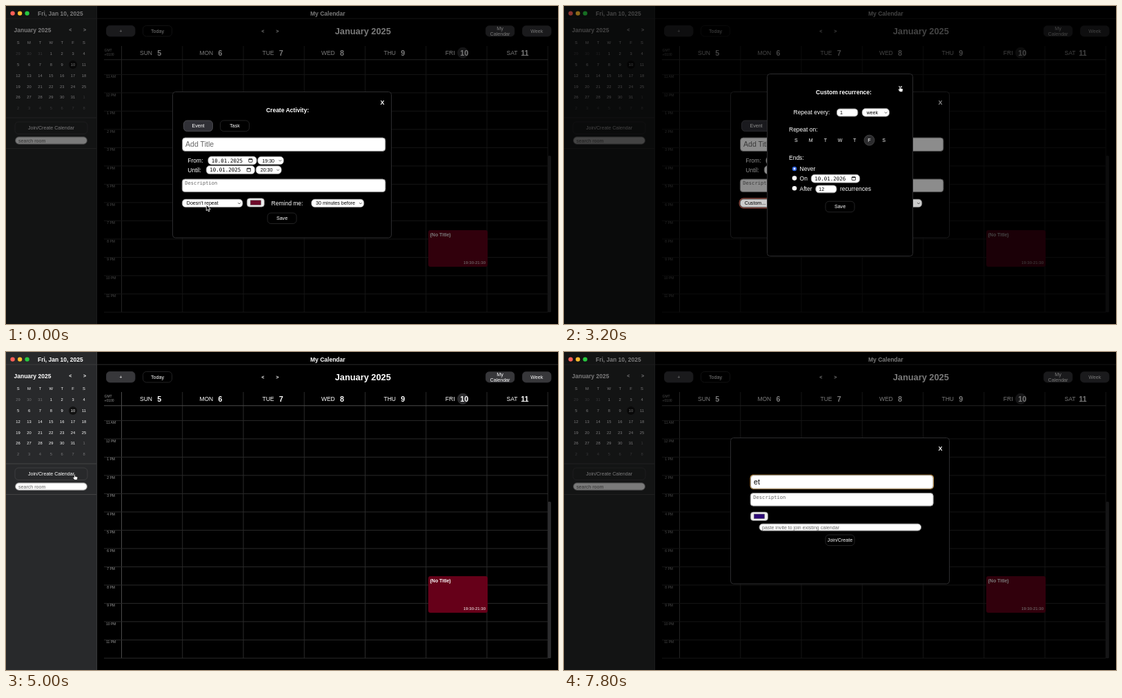
Recreate the animation shown at these times as an HTML page. Size 800x461 px, loop 8000 ms.

```html
<!DOCTYPE html>
<html lang="en">
<head>
<meta charset="utf-8">
<title>My Calendar</title>
<style>
  html, body { margin: 0; width: 100%; height: 100%; overflow: hidden; background: #000; }
  svg { display: block; width: 100%; height: 100%; }
  text { font-family: "Liberation Sans", Arial, sans-serif; white-space: pre; }
  .mono { font-family: "DejaVu Sans Mono", monospace; }
</style>
</head>
<body>
<svg id="stage" viewBox="0 0 800 461" xmlns="http://www.w3.org/2000/svg"></svg>
<script>
const LOOP = 8000, STEP = 200;
const stage = document.getElementById('stage');

// ---- drawing helpers (text y is the middle of the capitals) ----
const rect = (x, y, w, h, fill, r = 0, stroke = 'none', sw = 1) =>
  `<rect x="${x}" y="${y}" width="${w}" height="${h}" rx="${r}" fill="${fill}" stroke="${stroke}" stroke-width="${sw}"/>`;
const line = (x1, y1, x2, y2, color = '#2a2a2a', w = 1) =>
  `<path d="M${x1} ${y1}L${x2} ${y2}" stroke="${color}" stroke-width="${w}" fill="none"/>`;
const circle = (x, y, r, fill, stroke = 'none', sw = 1) =>
  `<circle cx="${x}" cy="${y}" r="${r}" fill="${fill}" stroke="${stroke}" stroke-width="${sw}"/>`;
const text = (s, x, y, { size = 7.1, fill = '#fff', anchor = 'start', bold = false, mono = false } = {}) =>
  `<text x="${x}" y="${(y + size * 0.355).toFixed(2)}" font-size="${size}" fill="${fill}" text-anchor="${anchor}"` +
  `${bold ? ' font-weight="700"' : ''}${mono ? ' class="mono"' : ''}>${s}</text>`;
const mid = (s, x, y, o = {}) => text(s, x, y, { ...o, anchor: 'middle' });
const group = (id, body) => `<g id="${id}">${body}</g>`;

// ---- form controls ----
const button = (s, x, y, w, h, fill = '#000', stroke = '#2b2b2d') =>
  rect(x, y, w, h, fill, 5, stroke, 0.8) + mid(s, x + w / 2, y + h / 2);
const field = (x, y, w, h, r = 4) => rect(x, y, w, h, '#fff', r, '#8a8a8a', 1);
const chevron = (x, y) =>
  `<path d="M${x - 1.8} ${y - 0.8}l1.8 1.9l1.8 -1.9" fill="none" stroke="#444" stroke-width=".8"/>`;
const select = (id, s, x, y, w, h = 11.6) =>
  rect(x, y, w, h, '#fff', 5, '#777', 0.7) +
  group(id, text(s, x + 6.5, y + h / 2, { fill: '#000' })) + chevron(x + w - 5, y + h / 2);
const dateInput = (s, x, y) =>
  rect(x, y, 70.5, 12, '#fff', 5, '#777', 0.7) +
  text(s, x + 5, y + 6.2, { size: 7.5, fill: '#000', mono: true }) +
  rect(x + 59, y + 3.6, 5.2, 4.8, 'none', 0.6, '#111', 0.8) + line(x + 59, y + 4.2, x + 64.2, y + 4.2, '#111', 1.2);
const swatch = (x, y, color) =>
  rect(x, y, 25.2, 12.4, '#eee', 4, '#777', 0.6) + rect(x + 5, y + 3, 15.2, 6.5, color, 0, '#555', 0.5);
const panel = (x, y, w, h) => rect(x, y, w, h, '#000', 4, '#2c2c2e', 1);
const radio = (y, on) => circle(334, y, 3.3, on ? '#2f63e0' : '#fff') + (on ? circle(334, y, 1.4, '#fff') : '');

// ---- app window ----
function sidebar() {
  let s = rect(0, 0, 132, 461, '#28292b') + line(131.6, 0, 131.6, 461, '#3a3a3c') +
    line(0, 18.2, 131, 18.2, '#3a3a3c') + line(0, 162, 131, 162, '#444') + line(0, 206.6, 131, 206.6, '#444') +
    text('Fri, Jan 10, 2025', 46, 10.5, { size: 8.5, bold: true }) +
    text('January 2025', 11.5, 34.5, { size: 8.5, bold: true }) +
    mid('&lt;', 93.3, 34.5, { bold: true }) + mid('&gt;', 114, 34.5, { bold: true }) +
    circle(97, 85, 6, '#111');
  [...'SMTWTFS'].forEach((d, i) => s += mid(d, 17.6 + i * 15.9, 53, { size: 5.8 }));
  for (let i = 0; i < 42; i++) {
    const n = i - 2, day = n < 1 ? n + 31 : n > 31 ? n - 31 : n;
    s += mid(day, 17.6 + i % 7 * 15.9, 69 + Math.floor(i / 7) * 15.85,
      { size: 5.8, fill: n < 1 || n > 31 ? '#747476' : '#fff' });
  }
  return s + button('Join/Create Calendar', 13, 168, 105, 17.5, '#28292b', '#434345') +
    field(13.6, 189.8, 103.8, 10.4, 5) + text('search room', 18, 195, { fill: '#666' });
}

function week() {
  const left = 167.5, colW = 88.25;
  let s = line(132, 18.2, 800, 18.2, '#2a2a2a') +
    mid('My Calendar', 466.3, 10.5, { size: 8.5, bold: true }) +
    button('+', 145.5, 28.5, 41.5, 15.5, '#37373a', '#37373a') + button('Today', 198.5, 28.5, 42, 15.5) +
    mid('&lt;', 372.3, 36.3, { bold: true }) + mid('&gt;', 393.3, 36.3, { bold: true }) +
    mid('January 2025', 517.3, 36.5, { size: 12.8, bold: true }) +
    button('', 695.3, 28.8, 41.5, 15.2, '#37373a', '#37373a') + button('Week', 748.5, 28.8, 41.5, 15.2, '#37373a', '#37373a') +
    mid('My', 716, 32.6) + mid('Calendar', 716, 40.4) +
    text('GMT', 142.5, 64.4, { size: 5, fill: '#999' }) + text('+0100', 142.5, 70.6, { size: 5, fill: '#999' });
  for (let i = 0; i < 8; i++) s += line(left + i * colW, 58, left + i * colW, 444, i ? '#2a2a2a' : '#4a4a4a');
  s += line(142, 77.8, 785.5, 77.8, '#4a4a4a');
  for (let i = 0; i < 14; i++) s += line(142, 99.4 + i * 26.5, 785.5, 99.4 + i * 26.5);
  for (let i = 0; i < 13; i++) {
    const label = i < 1 ? '11 AM' : (i < 2 ? 12 : i - 1) + ' PM';
    s += mid(label, 152.2, 102.6 + i * 26.5, { size: 5, fill: '#999' });
  }
  s += circle(662, 67.8, 8, '#2c2c2e');
  ['SUN', 'MON', 'TUE', 'WED', 'THU', 'FRI', 'SAT'].forEach((d, i) => {
    const x = left + i * colW, end = i === 5 ? 41.8 : 44.5;
    s += text(d, x + end, 67.8, { size: 8.5, anchor: 'end' }) +
      mid(i + 5, x + (i === 5 ? 55.5 : 54.8), 67.8, { size: 10.7, bold: true });
  });
  return s + rect(785.3, 217, 4.6, 227, '#2c2c2e', 1.5) +
    rect(612, 325, 86, 53, '#660019', 3) +
    text('(No Title)', 614.5, 331.5, { size: 7, bold: true }) +
    text('19:30-21:30', 695, 371.8, { size: 6, anchor: 'end' });
}

// ---- dialogs ----
const closeX = (x, y) => mid('X', x, y, { size: 8.8, bold: true });
const activity = () =>
  panel(241.5, 124.5, 317, 211.5) + group('closeHover', rect(538, 130.5, 15, 17, '#3a3a3d', 5)) + closeX(545.5, 140) +
  mid('Create Activity:', 408, 150.5, { size: 8.5, bold: true }) +
  button('Event', 257.5, 166, 42, 15.6, '#303036', '#55555a') + button('Task', 310.5, 166, 42, 15.6) +
  field(255.6, 191, 294.2, 19.4) + text('Add Title', 260, 200.6, { size: 10.6, fill: '#666' }) +
  text('From:', 263.3, 224, { size: 8.5 }) + dateInput('10.01.2025', 292.8, 218) + select('fromTime', '19:30', 364.8, 218.2, 37.6) +
  text('Until:', 263.3, 237.5, { size: 8.5 }) + dateInput('10.01.2025', 290.2, 231.6) + select('untilTime', '20:30', 362.2, 231.8, 37) +
  field(255.3, 251, 294.6, 18.6) + text('Description', 259.3, 256.8, { size: 7.1, fill: '#666', mono: true }) +
  swatch(349.2, 278.8, '#6e0a2a') + text('Remind me:', 384.6, 285.8, { size: 8.5 }) +
  button('Save', 379, 300, 42, 15.5);
const selects = () =>
  group('focusRing', rect(254.2, 279, 90, 13.8, 'none', 6, '#b0574a', 1.4)) +
  select('repeat', "Doesn't repeat", 255.3, 280.1, 87.7) + select('remind', '30 minutes before', 442.6, 280.1, 76.2);

function menu() {
  const items = ["Doesn't repeat", 'Daily', 'Weekdays', 'Weekly', '10. day every Month', '2. Friday every Month', 'Annually', 'Custom...'];
  return rect(251, 278, 91, 98, '#2b2b2d', 4, '#444', 0.7) +
    group('pick', rect(254.5, -5.9, 84, 11.8, '#2546c0', 2.5)) +
    `<path d="M256.6 286l1.5 2l2.6 -4.2" fill="none" stroke="#fff" stroke-width=".9"/>` +
    items.map((s, i) => text(s, 263.2, 286 + i * 11.7)).join('');
}

function recurrence() {
  let s = panel(294.5, 98.5, 211, 264) + closeX(487.4, 118.5) +
    mid('Custom recurrence:', 405.5, 124.8, { size: 8.5, bold: true }) +
    text('Repeat every:', 332.5, 154, { size: 8.5 }) +
    field(395.4, 149, 30.4, 11, 4.5) + text('1', 400, 154.6, { fill: '#000' }) + select('unit', 'week', 432, 148.6, 39.5) +
    text('Repeat on:', 326, 178.8, { size: 8.5 }) + circle(442.5, 194.6, 7.5, '#2c2c2e', '#48484a', 0.8);
  [...'SMTWTFS'].forEach((d, i) => s += mid(d, 336.4 + i * 21.2, 194.4));
  return s + text('Ends:', 326, 220.2, { size: 8.5 }) +
    radio(236, true) + text('Never', 341.6, 236.4, { size: 8.5 }) +
    radio(249.6) + text('On', 341.6, 250, { size: 8.5 }) + dateInput('10.01.2026', 358.2, 244.2) +
    radio(264.2) + text('After', 341.6, 264.8, { size: 8.5 }) +
    field(364.8, 260, 30.2, 10.8, 4.5) + text('12', 369.2, 265.4, { fill: '#000' }) +
    text('recurrences', 400, 264.8, { size: 8.5 }) + button('Save', 379, 283.2, 42, 15.5);
}

const room = () =>
  panel(241.5, 124.5, 317, 211.5) + closeX(545.5, 140) +
  group('roomFocus', rect(269.6, 177.7, 266.4, 21.2, '#f0a020', 5)) +
  field(270.6, 178.7, 264.4, 19.4) + group('roomTitle', '') +
  field(270.2, 204.6, 265, 18.6) + text('Description', 274.3, 210.3, { size: 7.1, fill: '#666', mono: true }) +
  swatch(270.4, 232, '#2e0a78') +
  field(283, 249.1, 234.6, 10, 5) + text('paste invite to join existing calendar', 287, 254.1, { fill: '#666' }) +
  button('Join/Create', 379, 265, 42, 15.6);

const arrow = `<path d="M0 0V8.6L2 6.9L3.3 9.8L4.7 9.2L3.4 6.4H6Z" fill="#000" stroke="#fff" stroke-width=".8" stroke-linejoin="round"/>`;
const hand = `<path d="M0 .6Q.8 -.4 1.5 .6V3.2L4.6 4Q5.4 4.2 5.2 5.4L4.5 8.4H.8L-1.8 5.2Q-1.6 4.2 -.6 4.6L0 5Z" fill="#fff" stroke="#000" stroke-width=".6"/>`;

stage.innerHTML =
  group('app', sidebar() + week()) +
  group('shade', rect(0, 0, 800, 461, '#000')) +
  ['#ff5f57', '#febc2e', '#28c840'].map((c, i) => circle(9.6 + i * 10.5, 10.6, 3.2, c)).join('') +
  group('activity', activity()) + group('shade2', rect(0, 0, 800, 461, '#000')) + group('selects', selects()) +
  group('menu', menu()) + group('recurrence', recurrence()) + group('room', room()) +
  group('arrow', arrow) + group('hand', hand);

const el = {};
stage.querySelectorAll('[id]').forEach(g => el[g.id] = g);
const show = (id, on) => el[id].style.display = on ? '' : 'none';

// ---- motion: time, x, y of the pointer tip ----
const path = [
  [0, 290.3, 288.2], [200, 290.3, 288.2], [1000, 291, 372], [1400, 291, 372], [2200, 425.8, 214],
  [2600, 427, 212], [3100, 486, 116], [3400, 486, 116], [3900, 542.6, 141], [4200, 542.6, 141],
  [4900, 98.6, 177], [5400, 98.6, 177], [6200, 330, 188], [8000, 330, 188]
];
function pointer(t) {
  const i = path.findIndex((p, k) => k && t <= p[0]);
  const [t0, x0, y0] = path[i - 1], [t1, x1, y1] = path[i];
  const u = (t - t0) / (t1 - t0), e = u * u * (3 - 2 * u);
  return [x0 + (x1 - x0) * e, y0 + (y1 - y0) * e];
}

function render(t) {
  const [x, y] = pointer(t);
  const inActivity = t < 4200, inRoom = t >= 5200, inMenu = t >= 200 && t < 1400;
  const inRecur = t >= 1400 && t < 3400, focused = t >= 6200;

  show('shade', inActivity || inRoom);
  el.shade.setAttribute('opacity', 0.52);
  show('activity', inActivity);
  show('selects', inActivity);
  show('shade2', inRecur);
  el.shade2.setAttribute('opacity', 0.45);
  el.selects.setAttribute('opacity', inRecur ? 0.8 : 1);
  show('focusRing', inRecur);
  show('recurrence', inRecur);
  show('room', inRoom);
  el.repeat.firstChild.textContent = t < 1400 ? "Doesn't repeat" : 'Custom...';

  show('menu', inMenu);
  el.menu.setAttribute('opacity', t < 1200 ? 1 : 0.38);
  const row = Math.max(0, Math.min(7, Math.round((y - 286) / 11.7)));
  el.pick.setAttribute('transform', `translate(0 ${286 + row * 11.7})`);

  const overClose = t >= 3800 && t < 4200;
  show('closeHover', overClose);
  show('roomFocus', focused);
  const typed = t >= 7800 ? 'et' : t >= 7600 ? 'e' : '';
  el.roomTitle.innerHTML = text(typed || 'Unnamed Room', 275, 188.3, { size: 10.6, fill: typed ? '#000' : '#666' });

  const onHand = overClose || (t >= 3000 && t < 3400) || (t >= 4800 && t < 5200);
  show('arrow', !onHand && t < 7600);
  show('hand', onHand);
  el.arrow.setAttribute('transform', `translate(${x} ${y})`);
  el.hand.setAttribute('transform', `translate(${x} ${y})`);
}

const start = performance.now();
function tick() {
  const t = (performance.now() - start) % LOOP;
  render(Math.floor(t / STEP) * STEP);
  requestAnimationFrame(tick);
}
tick();
</script>
</body>
</html>
```
